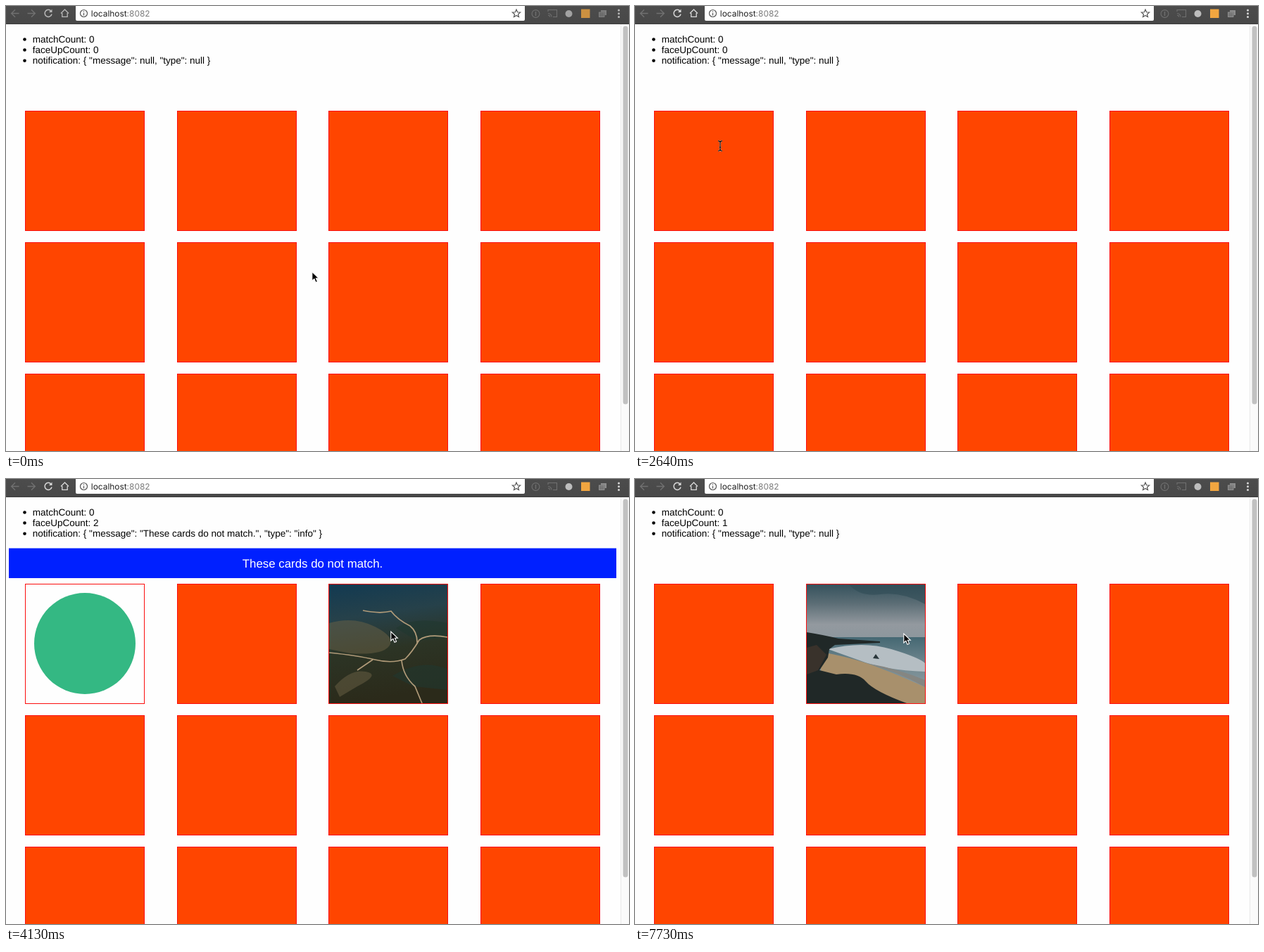
An HTML page for the animation above (8 s loop, 885 by 633 pixels).

```html
<!DOCTYPE html>
<html lang="en">
<head>
<meta charset="utf-8">
<title>Memory cards</title>
<style>
html, body { margin: 0; width: 100%; height: 100%; overflow: hidden; background: #fefefe; }
svg { display: block; width: 885px; height: 633px; }
text { font-family: "Liberation Sans", Arial, sans-serif; font-size: 13.5px; text-rendering: geometricPrecision; white-space: pre; }
.url { font-family: Inter, sans-serif; font-size: 11.9px; }
.banner { font-size: 16.85px; fill: #fff; text-anchor: middle; }

/* every state switches hard on an 8 s loop */
.icons, .zero, .one, .two, .quiet, .first, .beach, .arrow, .beam, #pointer {
  animation: 8s step-end infinite;
}
.icons { animation-name: wake; }
.zero { animation-name: zero; }
.one { animation-name: one; }
.two { animation-name: two; }
.quiet { animation-name: quiet; }
.first { animation-name: first; }
.beach { animation-name: beach; }
.arrow { animation-name: arrow; }
.beam { animation-name: beam; }
#pointer { animation-name: move; }

@keyframes wake { 0% { opacity: .78 } 27.625%, 100% { opacity: 1 } }
@keyframes zero { 0%, 89.125% { opacity: 1 } 34.875%, 96.625%, 100% { opacity: 0 } }
@keyframes one { 0%, 51.625% { opacity: 0 } 34.875%, 96.625%, 100% { opacity: 1 } }
@keyframes two { 0%, 89.125%, 100% { opacity: 0 } 51.625% { opacity: 1 } }
@keyframes quiet { 0%, 89.125%, 100% { opacity: 1 } 51.625% { opacity: 0 } }
@keyframes first { 0%, 89.125%, 100% { opacity: 0 } 34.875% { opacity: 1 } }
@keyframes beach { 0% { opacity: 0 } 96.625%, 100% { opacity: 1 } }
@keyframes arrow { 0%, 46%, 100% { opacity: 1 } 33% { opacity: 0 } }
@keyframes beam { 0%, 46%, 100% { opacity: 0 } 33% { opacity: 1 } }
@keyframes move {
  0% { transform: translate(434px, 377px) }
  3.75% { transform: translate(345px, 251px) }
  5.625% { transform: translate(204px, 181px) }
  7.5% { transform: translate(176px, 142px) }
  9.375% { transform: translate(89px, 33px) }
  11.125% { transform: translate(88px, 28px) }
  13% { transform: translate(104px, 48px) }
  14.75% { transform: translate(114px, 50px) }
  16.625% { transform: translate(113px, 46px) }
  18.5% { transform: translate(123px, 62px) }
  20.25% { transform: translate(127px, 68px) }
  24% { transform: translate(139px, 163px) }
  25.875% { transform: translate(117px, 198px) }
  27.625% { transform: translate(118px, 197px) }
  29.25% { transform: translate(119px, 196px) }
  33% { transform: translate(117px, 191px) }
  46% { transform: translate(462px, 211px) }
  47.875% { transform: translate(545px, 216px) }
  49.75% { transform: translate(546px, 216px) }
  61% { transform: translate(492px, 217px) }
  62.875% { transform: translate(385px, 217px) }
  64.75%, 100% { transform: translate(381px, 219px) }
}
</style>
</head>
<body>
<svg viewBox="0 0 885 633">
  <defs>
    <linearGradient id="bar" x2="0" y2="1">
      <stop stop-color="#4c4c4c"/><stop offset=".9" stop-color="#484848"/><stop offset="1" stop-color="#404040"/>
    </linearGradient>
    <linearGradient id="land" x2=".15" y2="1">
      <stop stop-color="#123a52"/><stop offset=".3" stop-color="#26414a"/>
      <stop offset=".6" stop-color="#2c3425"/><stop offset="1" stop-color="#2b2a1a"/>
    </linearGradient>
    <linearGradient id="sky" x2="0" y2="1">
      <stop stop-color="#35525d"/><stop offset=".35" stop-color="#5b6d75"/>
      <stop offset=".75" stop-color="#93999f"/><stop offset="1" stop-color="#8d979d"/>
    </linearGradient>
    <linearGradient id="sea" x2="0" y2="1">
      <stop stop-color="#456873"/><stop offset=".4" stop-color="#6f868e"/><stop offset="1" stop-color="#9ca8ad"/>
    </linearGradient>
    <clipPath id="face"><path d="M0 0H168V169H0Z"/></clipPath>
    <g id="card">
      <rect x=".5" y=".5" width="169" height="170" fill="#ff4500" stroke="#fb0d0d"/>
    </g>
    <g id="row">
      <use href="#card" x="27"/><use href="#card" x="243"/>
      <use href="#card" x="458"/><use href="#card" x="674"/>
    </g>
  </defs>

  <rect width="885" height="633" fill="#fefefe"/>

  <!-- browser bar -->
  <rect width="885" height="26" fill="url(#bar)"/>
  <path d="M99 0H737V19a2 2 0 0 1-2 2H101a2 2 0 0 1-2-2Z" fill="#fff"/>
  <g fill="none" stroke="#707070" stroke-width="1.4">
    <path d="M18.5 10.5H8M13 5.2 7.7 10.500 13 15.800M30.500 10.500H41M36 5.200 41.300 10.500 36 15.800"/>
    <circle cx="752.500" cy="11" r="5.400" stroke-width="1.100"/>
    <path d="M752.500 8V14" stroke-width="1.300"/>
    <path d="M770 8V5.500H782.500V15.500H777M770 10.500a5 5 0 0 1 5 5M770 13a2.500 2.500 0 0 1 2.500 2.500" stroke-width="1.100"/>
  </g>
  <g class="icons">
    <g fill="none" stroke="#d8d8d8" stroke-width="1.500">
      <path d="M64 7.200A5 5 0 1 0 65 11.500"/>
      <path d="M78 10.500 83.500 5 89 10.500M79.800 10V15.300H87.200V10" stroke-width="1.300"/>
    </g>
    <path d="M65.500 4.500V9H61Z" fill="#d8d8d8"/>
    <circle cx="799.500" cy="11" r="5" fill="#bdbdbd"/>
    <rect x="817" y="4.500" width="12.500" height="12.500" fill="#f2a640"/>
    <path d="M845 6H853V13H850.500V8.500H845Z" fill="#8e8e8e"/>
    <rect x="842.500" y="9" width="7.500" height="6.500" fill="#777" stroke="#999" stroke-width=".8"/>
    <g fill="#d8d8d8">
      <circle cx="870.500" cy="6" r="1.500"/><circle cx="870.500" cy="10.700" r="1.500"/><circle cx="870.500" cy="15.400" r="1.500"/>
    </g>
  </g>
  <g fill="none" stroke="#555" stroke-width="1.200">
    <circle cx="110.500" cy="10.500" r="5"/>
    <path d="M110.500 9.700V13.500M110.500 7.200V8.500"/>
    <path d="M725 5 726.600 8.800 730.600 9.100 727.500 11.700 728.500 15.600 725 13.500 721.500 15.600 722.500 11.700 719.400 9.100 723.400 8.800Z"/>
  </g>
  <text class="url" x="120.800" y="14.800" fill="#222">localhost<tspan fill="#7c7c7c">:8082</tspan></text>

  <!-- scroll bar -->
  <rect x="873" y="26" width="12" height="607" fill="#fafafa"/>
  <path d="M873.500 26V633" stroke="#e8e8e8"/>
  <rect x="876.500" y="28.500" width="7" height="538" rx="3.500" fill="#c1c1c1"/>

  <!-- state list -->
  <circle cx="26.500" cy="47.500" r="2.300"/><circle cx="26.500" cy="62.500" r="2.300"/><circle cx="26.500" cy="77.700" r="2.300"/>
  <text x="37.800" y="51.500">matchCount: 0</text>
  <text class="zero" x="37.800" y="66.600">faceUpCount: 0</text>
  <text class="one" x="37.800" y="66.600">faceUpCount: 1</text>
  <text class="two" x="37.800" y="66.600">faceUpCount: 2</text>
  <text class="quiet" x="37.800" y="81.700">notification: { "message": null, "type": null }</text>
  <g class="two">
    <text x="37.800" y="81.700">notification: { "message": "These cards do not match.", "type": "info" }</text>
    <rect x="4" y="98.500" width="863" height="42.500" fill="#0020ff"/>
    <text class="banner" x="435.500" y="125.600">These cards do not match.</text>
  </g>

  <!-- cards -->
  <use href="#row" y="149"/><use href="#row" y="336"/><use href="#row" y="523"/>

  <g class="first" transform="translate(28 150)">
    <rect width="168" height="169" fill="#fefefe"/>
    <circle cx="84" cy="84" r="72" fill="#34b883"/>
  </g>

  <g class="beach" transform="translate(244 150)" clip-path="url(#face)">
    <rect width="168" height="76" fill="url(#sky)"/>
    <path d="M60 0H168V28Q135 10 105 14T60 0Z" fill="#2f4b56" opacity=".6"/>
    <rect y="75" width="168" height="94" fill="url(#sea)"/>
    <path d="M30 92Q80 80 120 92T168 112V124Q110 122 75 108Z" fill="#b5bec3"/>
    <path d="M20 96Q55 102 85 112T168 146V169H100L20 135Z" fill="#a8906c"/>
    <path d="M85 112Q130 120 168 136V146Q125 122 85 112Z" fill="#858682"/>
    <path d="M0 68Q25 72 45 77L104 81V83L40 86 32 92 30 104 18 122 42 128Q72 124 84 138T142 169H0Z" fill="#202827"/>
    <path d="M0 90 14 86 28 100 16 122 0 128Z" fill="#39322b"/>
    <path d="M94 105 98 99 103 106Z" fill="#29363a"/>
  </g>

  <g class="two" transform="translate(459 150)" clip-path="url(#face)">
    <rect width="168" height="169" fill="url(#land)"/>
    <path d="M0 55Q35 45 65 60T85 88 30 98L0 92ZM8 145Q30 120 52 124T40 145L15 160Z" fill="#6d6247" opacity=".5"/>
    <path d="M95 62Q120 45 168 55V75L125 80ZM90 130Q130 105 168 120V150L120 145Z" fill="#20382f" opacity=".6"/>
    <path d="M0 97Q40 101 65 107T108 106Q118 96 128 79 140 70 168 75M48 37Q72 42 88 38 97 50 115 59 126 68 125 85M103 108Q105 130 122 145L132 169M62 107 40 122" fill="none" stroke="#b19b79" stroke-width="1.700"/>
  </g>

  <g id="pointer">
    <path class="arrow" d="M.8 1V14L3.900 11.200 6 16.200 8.500 15.200 6.400 10.300H10.300Z" stroke="#fff" stroke-width="1.100"/>
    <g class="beam" fill="none">
      <path id="stem" d="M1 .8Q4 .8 4 3V13Q4 15.200 1 15.200M7 .8Q4 .8 4 3M4 13Q4 15.200 7 15.200M2.500 10H5.500" stroke="#fff" stroke-opacity=".55" stroke-width="2.200"/>
      <use href="#stem" opacity="0"/>
      <path d="M1 .8Q4 .8 4 3V13Q4 15.200 1 15.200M7 .8Q4 .8 4 3M4 13Q4 15.200 7 15.200M2.500 10H5.500" stroke="#111" stroke-width="1.200"/>
    </g>
  </g>
</svg>
</body>
</html>
```
